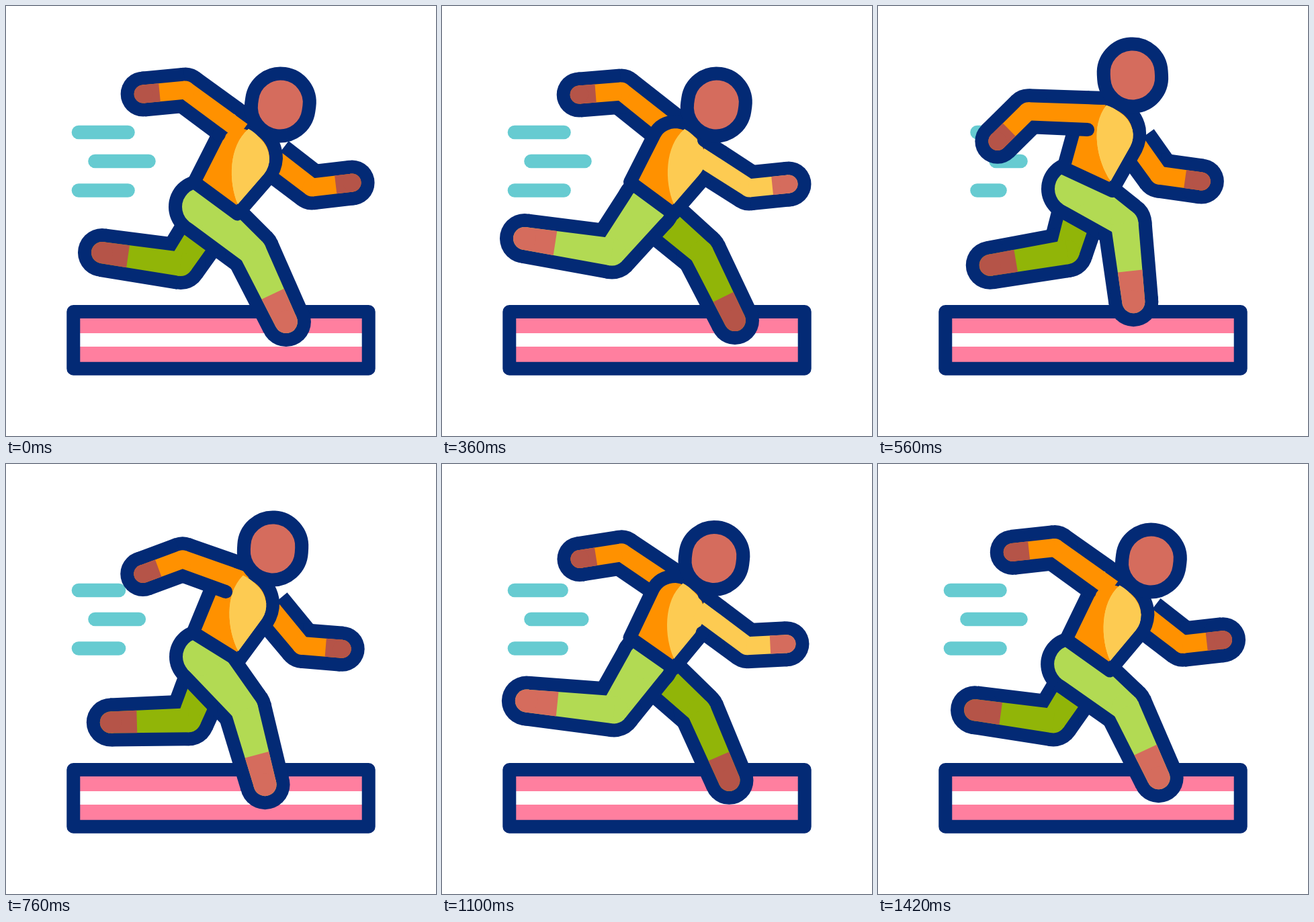
Write an HTML page with a canvas that moves like this. It is 640 px wide and 640 px high and loops after 1.44 s.

```html
<!DOCTYPE html>
<html lang="en">
<head>
<meta charset="utf-8">
<title>Runner</title>
<style>
html, body { margin: 0; width: 100%; height: 100%; overflow: hidden; background: #fff; }
canvas { display: block; width: 640px; height: 640px; }
</style>
</head>
<body>
<canvas id="stage"></canvas>
<script>
const NAVY = '#032a75', ORANGE = '#ff9100', YELLOW = '#fdcb52', PINK = '#ff7f9f', TEAL = '#66cbd1';
const LIME = '#b2da53', OLIVE = '#91b508', SKIN = '#d56c5d', SHADE = '#b55448';
const CYCLE = 720, HALF = 360, LINE = 20;

const canvas = document.getElementById('stage');
const ctx = canvas.getContext('2d');
const dpr = window.devicePixelRatio || 1;
canvas.width = canvas.height = 640 * dpr;

// Periodic monotone cubic through (times, values)
function curve(times, values, period) {
  const n = times.length;
  const span = i => (i < n - 1 ? times[i + 1] : period) - times[i];
  const slope = times.map((_, i) => (values[(i + 1) % n] - values[i]) / span(i));
  const tangent = slope.map((b, i) => {
    const a = slope[(i + n - 1) % n];
    return a * b <= 0 ? 0 : 2 * a * b / (a + b);
  });
  return time => {
    const t = time % period;
    let i = n - 1;
    while (times[i] > t) i--;
    const j = (i + 1) % n, h = span(i), u = (t - times[i]) / h, v = 1 - u;
    return values[i] * (1 + 2 * u) * v * v + values[j] * u * u * (3 - 2 * u)
      + h * u * v * (tangent[i] * v - tangent[j] * u);
  };
}

const bodyTimes = [0, 105, 180, 200, 340];
const bodyX = curve(bodyTimes, [280, 275, 275.5, 276, 280], HALF);
const bodyY = curve(bodyTimes, [262, 229, 235, 241, 261], HALF);
const bodyTilt = curve(bodyTimes, [0, -13.5, -12, -11.5, -1], HALF);

// Root, middle and end joint at each key time
const keys = [0, 200, 360, 540, 560];
const poses = {
  nearArm: [
    [331, 172, 267, 125, 204, 131], [365, 199, 410, 257, 467, 267], [404, 237, 457, 271, 516, 265],
    [325, 157, 215, 172, 187, 224], [313, 160, 223, 157, 178, 202]],
  farArm: [
    [400, 228, 455, 270, 515, 263], [312, 165, 238, 165, 191, 210], [340, 185, 267, 127, 204, 132],
    [378, 200, 403, 252, 464, 274], [383, 203, 418, 252, 481, 261]],
  nearLeg: [
    [290, 299, 367, 365, 417, 470], [305, 267, 264, 347, 138, 371], [307, 296, 253, 366, 123, 346],
    [291, 268, 368, 319, 369, 435], [291, 272, 367, 323, 380, 440]],
  farLeg: [
    [305, 316, 260, 384, 143, 367], [310, 270, 384, 332, 394, 437], [308, 300, 386, 367, 436, 468],
    [304, 290, 287, 364, 179, 396], [303, 295, 282, 366, 167, 386]]
};

function angle(x, y) {
  const a = Math.atan2(y, x);
  return a < -Math.PI / 2 ? a + 2 * Math.PI : a;
}

// Joint motion as root offset plus angle and length of both segments
function rig(own, other) {
  const early = own[1].map((v, i) => v + other[3][i] - other[4][i]);
  const times = [keys[0], 180, ...keys.slice(1)];
  const rows = [own[0], early, ...own.slice(1)].map(([ax, ay, bx, by, cx, cy], i) => [
    ax - bodyX(times[i]), ay - bodyY(times[i]),
    angle(bx - ax, by - ay), Math.hypot(bx - ax, by - ay),
    angle(cx - bx, cy - by), Math.hypot(cx - bx, cy - by)]);
  const tracks = rows[0].map((_, c) => curve(times, rows.map(r => r[c]), CYCLE));
  return t => {
    const [dx, dy, a1, l1, a2, l2] = tracks.map(f => f(t));
    const root = [bodyX(t) + dx, bodyY(t) + dy];
    const mid = along(root, a1, l1);
    return { root, mid, end: along(mid, a2, l2), a1, a2 };
  };
}

function along([x, y], a, d) {
  return [x + Math.cos(a) * d, y + Math.sin(a) * d];
}

const nearArm = rig(poses.nearArm, poses.farArm);
const farArm = rig(poses.farArm, poses.nearArm);
const nearLeg = rig(poses.nearLeg, poses.farLeg);
const farLeg = rig(poses.farLeg, poses.nearLeg);

function disc([x, y], r, color) {
  ctx.fillStyle = color;
  ctx.beginPath();
  ctx.arc(x, y, r, 0, 2 * Math.PI);
  ctx.fill();
}

function taper(a, ra, b, rb, color) {
  const t = Math.atan2(b[1] - a[1], b[0] - a[0]) + Math.PI / 2;
  ctx.fillStyle = color;
  ctx.beginPath();
  ctx.moveTo(...along(a, t, ra));
  ctx.lineTo(...along(b, t, rb));
  ctx.lineTo(...along(b, t, -rb));
  ctx.lineTo(...along(a, t, -ra));
  ctx.fill();
}

function segment(a, b, width, color) {
  ctx.strokeStyle = color;
  ctx.lineWidth = width;
  ctx.lineCap = 'round';
  ctx.beginPath();
  ctx.moveTo(...a);
  ctx.lineTo(...b);
  ctx.stroke();
}

function limb(p, [r0, r1, r2], cuff, cloth, skin, overlap = 0) {
  for (const [pad, color] of [[LINE, NAVY], [0, cloth]]) {
    const start = pad ? p.root : along(p.root, p.a1, -overlap);
    taper(start, r0 + pad, p.mid, r1 + pad, color);
    disc(p.mid, r1 + pad, color);
    taper(p.mid, r1 + pad, p.end, r2 + pad, color);
    disc(p.end, r2 + pad, color);
  }
  const k = cuff / Math.hypot(p.end[0] - p.mid[0], p.end[1] - p.mid[1]);
  taper(along(p.end, p.a2, -cuff), r2 + (r1 - r2) * k, p.end, r2, skin);
  disc(p.end, r2, skin);
}

function leg(p, radii, cuff, cloth, skin) {
  disc(p.root, radii[0] + LINE, NAVY);
  limb(p, radii, cuff, cloth, skin);
  // Round seat of the trousers
  disc(p.root, radii[0], cloth);
}

const torso = new Path2D('M280 262L316 191Q326 172 350 172Q368 174 384 188Q402 204 402 227Q401 243 391 256L344.5 309.5Z');
const shine = new Path2D('M361 183C331 208 331 262 345 295L384 250Q392 240 392 227Q391 209 377 196Q370 188 361 183Z');
const head = new Path2D();
head.roundRect(-43, -46.5, 86, 93, 43);

function onBody(t, draw) {
  ctx.save();
  ctx.translate(bodyX(t), bodyY(t));
  ctx.rotate(bodyTilt(t) * Math.PI / 180);
  ctx.translate(-280, -262);
  draw();
  ctx.restore();
}

function paint(path, fill) {
  ctx.fillStyle = fill;
  ctx.fill(path);
  ctx.strokeStyle = NAVY;
  ctx.lineWidth = LINE;
  ctx.lineJoin = 'round';
  ctx.stroke(path);
}

function drawShine(t) {
  onBody(t, () => {
    ctx.fillStyle = YELLOW;
    ctx.fill(shine);
  });
}

function drawNearArm(t) {
  const p = nearArm(t);
  const back = p.a1 > 1.83;
  const side = p.a1 + (back ? -1 : 1) * Math.PI / 2;
  const pit = along(p.root, side, 24), top = along(p.root, side, -24);
  limb(p, [14, 13.5, 13.5], 24.5, back ? ORANGE : YELLOW, back ? SHADE : SKIN, 25);
  segment(top, along(top, p.a1, back ? -25 : -32), LINE, NAVY);
  if (p.a1 > 2.6) drawShine(t);
  disc(pit, LINE / 2, NAVY);
}

function drawTrack() {
  ctx.fillStyle = PINK;
  ctx.fillRect(100, 455, 440, 85);
  ctx.fillStyle = '#fff';
  ctx.fillRect(100, 487, 440, 20);
  ctx.strokeStyle = NAVY;
  ctx.lineWidth = LINE;
  ctx.lineJoin = 'round';
  ctx.strokeRect(100.3, 455, 439.4, 84.8);
}

function drawWind(t) {
  const p = t % HALF;
  const clamp = v => Math.min(1, Math.max(0, v));
  const grow = 1 - (1 - clamp((p - 165) / 135)) ** 2;
  const u = clamp(p / 150), gone = u * u * (3 - 2 * u);
  for (const [left, right, y] of [[108, 181.5, 188], [132.5, 212.5, 231], [108, 181.5, 274.5]]) {
    const len = right - left;
    const a = p < 160 ? left : right - len * grow;
    const b = p < 160 ? right - len * gone : right;
    if (b - a > 0.5) segment([a, y], [b, y], 20.6, TEAL);
  }
}

function draw(t) {
  ctx.setTransform(dpr, 0, 0, dpr, 0, 0);
  ctx.fillStyle = '#fff';
  ctx.fillRect(0, 0, 640, 640);
  drawTrack();
  drawWind(t);
  limb(farArm(t), [14, 13.5, 13.5], 24.5, ORANGE, SHADE);
  leg(farLeg(t), [21, 18, 16], 39, OLIVE, SHADE);
  leg(nearLeg(t), [28, 20.5, 17], 46, LIME, SKIN);
  onBody(t, () => paint(torso, ORANGE));
  drawShine(t);
  drawNearArm(t);
  onBody(t, () => {
    ctx.translate(408.3, 147);
    ctx.rotate(8 * Math.PI / 180);
    paint(head, SKIN);
  });
}

const begin = performance.now();
function frame() {
  draw((performance.now() - begin) % CYCLE);
  requestAnimationFrame(frame);
}
frame();
</script>
</body>
</html>
```
